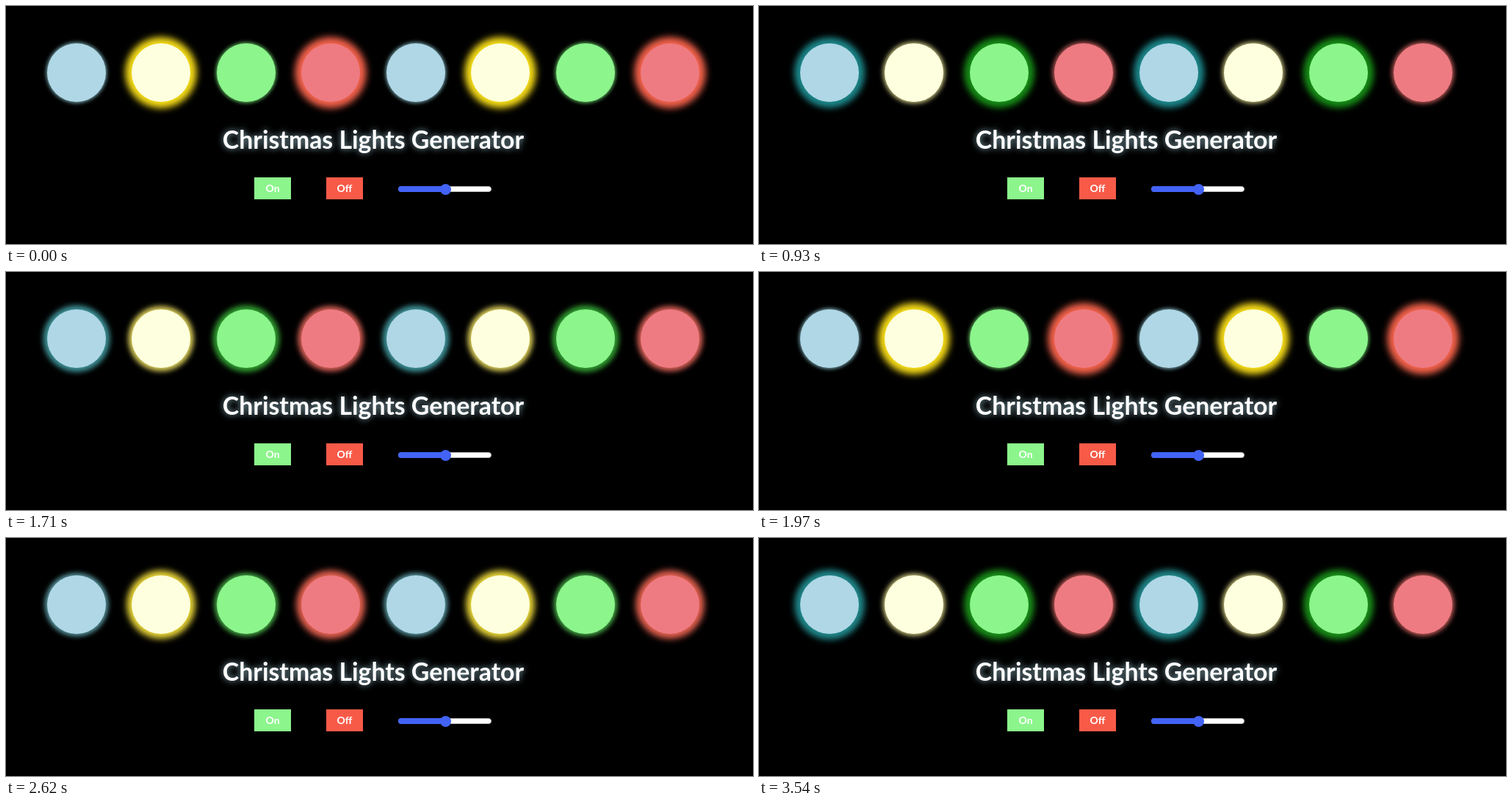
Recreate the animation shown at these times as an HTML page. Size 1017 px wide and 325 px high, loop 3640 ms.

```html
<!DOCTYPE html>
<html lang="en">
<head>
<meta charset="utf-8">
<title>Christmas Lights Generator</title>
<style>
  html, body { margin: 0; width: 100%; height: 100%; overflow: hidden; background: #000; }
  body { position: relative; font-family: Lato, "Open Sans", sans-serif; font-weight: 700; color: #fff; }
  body > * { position: absolute; }
  .light { top: 51px; width: 80px; height: 80px; border-radius: 50%; }
  h1 {
    left: 0; top: 162px; width: 1000px; margin: 0;
    font-size: 33.8px; line-height: 40px; text-align: center; white-space: nowrap;
    text-shadow: 0 0 8px #add8e6d0;
  }
  .button { top: 234px; width: 50px; height: 30px; font-size: 14px; line-height: 30px; text-align: center; }
  .on { left: 338px; background: #8cf58c; }
  .off { left: 436px; background: #f85a48; }
  .track {
    left: 534px; top: 246px; width: 127px; height: 8px; box-sizing: border-box;
    border: 1px solid #b2b2b2; border-radius: 4px; background: #fff;
  }
  .fill { left: 534px; top: 246px; width: 64px; height: 8px; border-radius: 4px 0 0 4px; background: #4263f5; }
  .thumb { left: 590.5px; top: 242.5px; width: 15px; height: 15px; border-radius: 50%; background: #4263f5; }
</style>
</head>
<body>
<h1>Christmas Lights Generator</h1>
<div class="button on">On</div>
<div class="button off">Off</div>
<div class="track"></div>
<div class="fill"></div>
<div class="thumb"></div>
<script>
const LOOP = 3640, HALF = 982, PEAK = 260;
const bulbs = [
  { fill: '#b0d7e6', glow: 'teal' },
  { fill: '#fdffde', glow: '#ffe000' },
  { fill: '#8cf58c', glow: 'green' },
  { fill: '#ee7b82', glow: 'tomato' }
];

const lights = Array.from({ length: 8 }, (_, i) => {
  const el = document.createElement('div');
  el.className = 'light';
  el.style.left = Math.round(56 + i * 115.45) + 'px';
  el.style.background = bulbs[i % 4].fill;
  document.body.append(el);
  return el;
});

// CSS "ease-in-out": cubic-bezier(.42, 0, .58, 1), solved by bisection
function easeInOut(x) {
  const bezier = (a, b, s) => 3 * a * s * (1 - s) ** 2 + 3 * b * s * s * (1 - s) + s ** 3;
  let lo = 0, hi = 1;
  for (let i = 0; i < 24; i++) {
    const mid = (lo + hi) / 2;
    if (bezier(.42, .58, mid) < x) lo = mid; else hi = mid;
  }
  return bezier(0, 1, lo);
}

// The picture advances in steps of about 130 ms
function snap(t) {
  if (t >= 3540) return 3540;
  if (t >= 670) return Math.min(3400, 670 + Math.floor((t - 670) / 130) * 130);
  return t >= 530 ? 530 : Math.min(390, Math.floor(t / 130) * 130);
}

// Each glow swells from a faint pale rim to a wide saturated halo
function draw(t) {
  const cycle = Math.abs(t - PEAK) / HALF % 2;
  const fall = easeInOut(cycle > 1 ? 2 - cycle : cycle);
  lights.forEach((el, i) => {
    const p = i % 2 ? 1 - fall : fall;
    const { fill, glow } = bulbs[i % 4];
    const color = `color-mix(in srgb, ${glow} ${100 * p}%, ${fill}bf)`;
    el.style.boxShadow = `0 0 ${5 + 5 * p}px ${10 * p}px ${color}`;
  });
}

const start = performance.now();
function tick() {
  draw(snap((performance.now() - start) % LOOP));
  requestAnimationFrame(tick);
}
tick();
</script>
</body>
</html>
```
